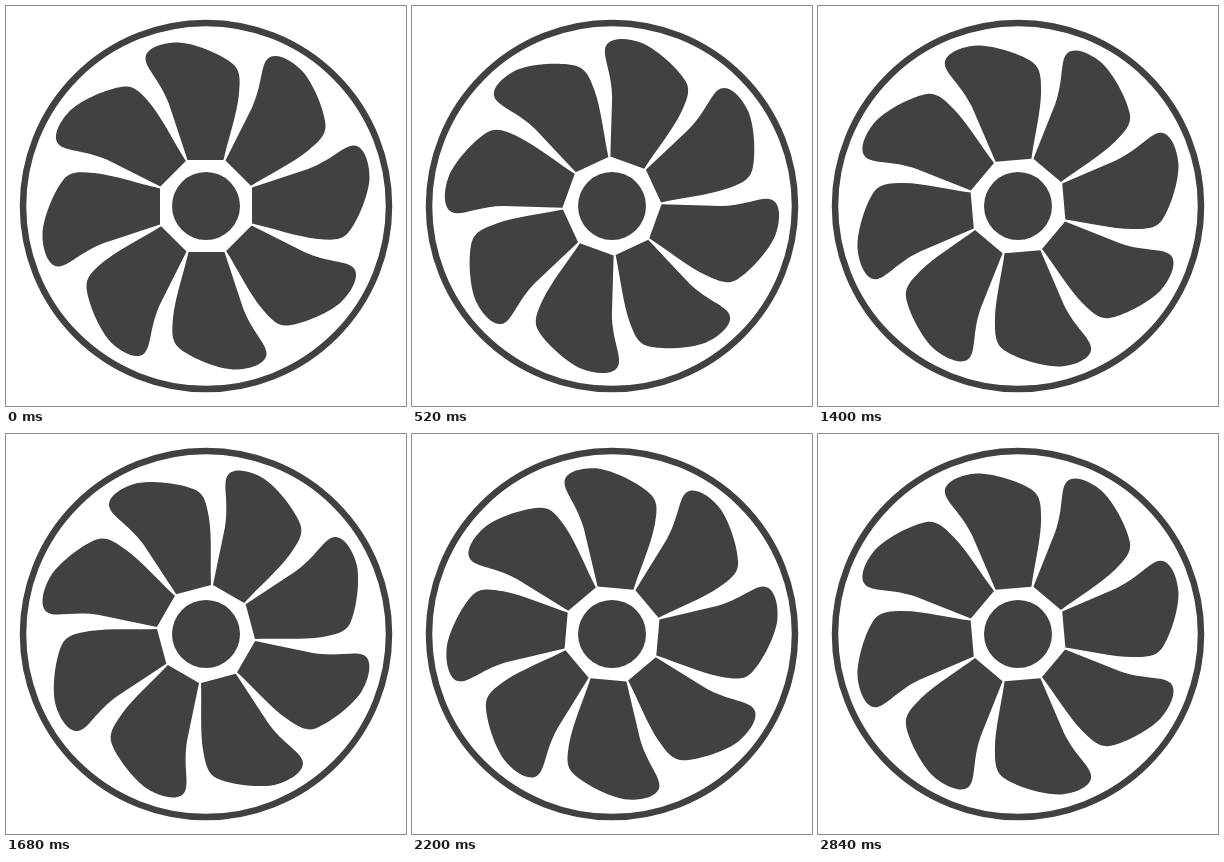
An HTML page with a canvas for the animation above (2.88 s loop, 400 by 400 pixels).

```html
<!DOCTYPE html>
<html lang="en">
<head>
<meta charset="utf-8">
<title>Fan</title>
<style>
  html, body { margin: 0; width: 100%; height: 100%; overflow: hidden; background: #fff; }
  canvas { display: block; width: 400px; height: 400px; }
</style>
</head>
<body>
<canvas id="stage" width="400" height="400"></canvas>
<script>
const ctx = document.getElementById('stage').getContext('2d');
const INK = '#414042';
const BLADES = 8;
const STEP_MS = 40;
const STEPS = 72;

// One blade, pointing up, relative to the hub centre.
const blade = new Path2D(
  'M-18.5 -46 L-37 -102 C-46 -126 -61 -138 -60.5 -148 ' +
  'C-60 -159 -41 -164 -27 -163.5 C-8 -162 18 -150 27 -142 ' +
  'C35 -135 34 -125 33 -112 C31 -92 22 -66 17.5 -46 Z'
);

function circle(radius) {
  ctx.beginPath();
  ctx.arc(0, 0, radius, 0, Math.PI * 2);
}

function draw(ms) {
  const step = Math.floor(ms / STEP_MS) % STEPS;
  ctx.setTransform(1, 0, 0, 1, 0, 0);
  ctx.fillStyle = '#fff';
  ctx.fillRect(0, 0, 400, 400);
  ctx.translate(200, 200);

  ctx.fillStyle = ctx.strokeStyle = INK;
  ctx.lineWidth = 6.5;
  circle(183);
  ctx.stroke();
  circle(34);
  ctx.fill();

  ctx.rotate(step / STEPS * Math.PI * 2);
  for (let i = 0; i < BLADES; i++) {
    ctx.fill(blade);
    ctx.rotate(Math.PI * 2 / BLADES);
  }
}

const start = performance.now();
function tick() {
  draw(performance.now() - start);
  requestAnimationFrame(tick);
}
tick();
</script>
</body>
</html>
```
